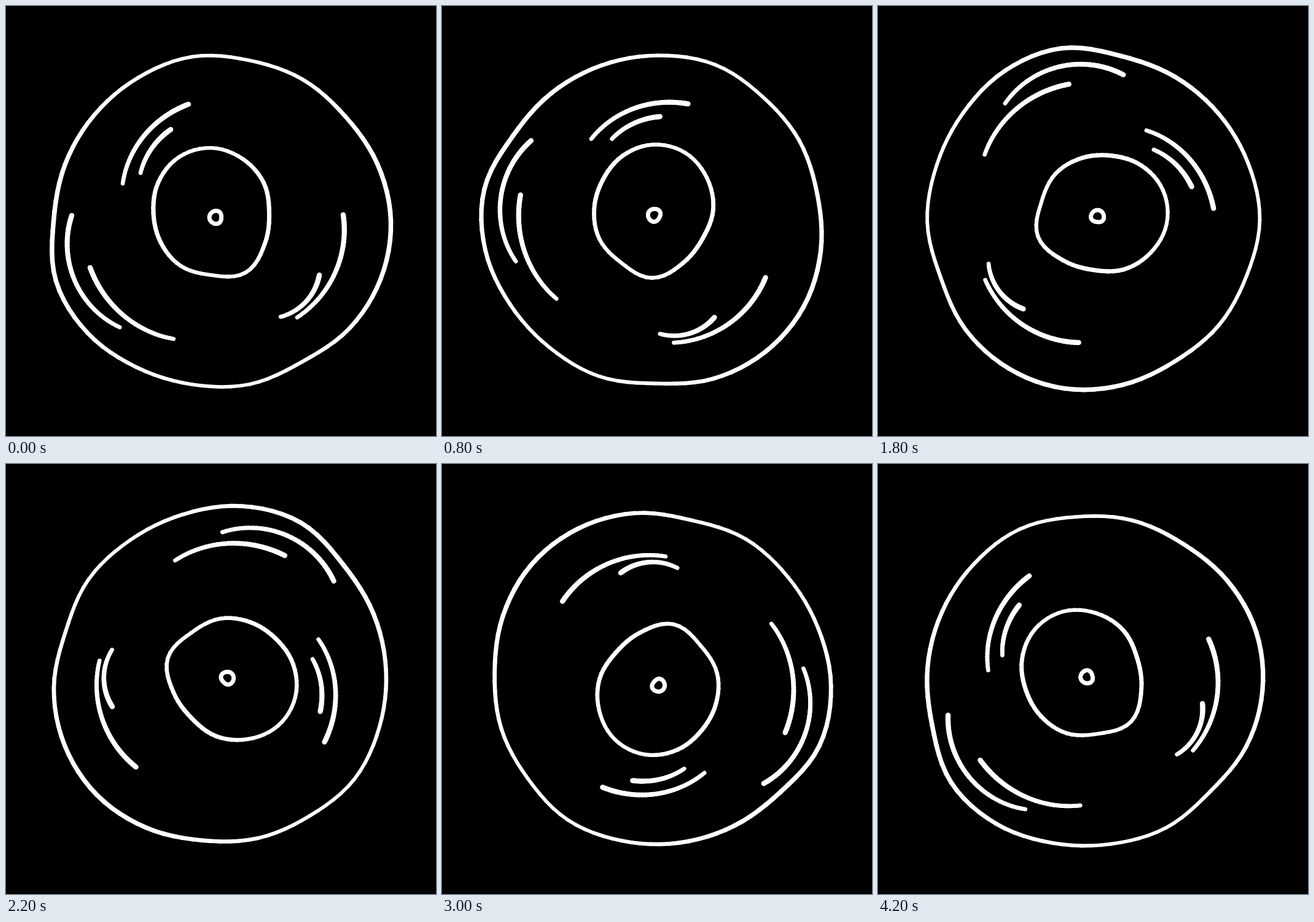
An HTML page with a canvas for the animation above (4400 ms loop, 700 by 700 pixels).

```html
<!DOCTYPE html>
<html>
<head>
<meta charset="utf-8">
<title>Spinning record</title>
<style>
  html, body { margin: 0; width: 100%; height: 100%; overflow: hidden; background: #000; }
  canvas { display: block; }
</style>
</head>
<body>
<canvas id="stage" width="700" height="700"></canvas>
<script>
const ctx = document.getElementById('stage').getContext('2d');
const SIZE = 700, MID = SIZE / 2, LOOP = 4400, STEPS = 22, TURN = 2 * Math.PI;

// Uneven rings: radii at equal angles, clockwise from the right.
const rings = [
  { x: MID, y: MID, swell: 0.9, radii: [276.5, 276.5, 272.5, 264.5, 269.8, 270.2, 275, 283.5, 285.8,
    272.5, 270, 269, 269.5, 271.5, 265.5, 266, 264.5, 271] },
  { x: 334, y: 337, swell: 0.5, radii: [94.5, 100.7, 112, 101, 99.3, 95, 94, 99.5, 105, 106, 102, 98.7] },
  { x: 341, y: 344, swell: 0, radii: [9.5, 11, 10, 10, 10, 11] }
];

// Shine marks around the middle: angles in degrees, radii at both ends, outward bulge.
const shines = [
  { from: 254.4, to: 200.9, inner: 197.3, outer: 171.2, bulge: 2.6 },
  { from: 241.2, to: 210.8, inner: 170, outer: 152.5, bulge: 2 },
  { from: 182.1, to: 133.6, inner: 243.2, outer: 239, bulge: 16 },
  { from: 160.4, to: 111.9, inner: 226.2, outer: 206.9, bulge: 4.5 },
  { from: -2.9, to: 51.7, inner: 199.2, outer: 200, bulge: 4.4 },
  { from: 28.8, to: 58.1, inner: 182.6, outer: 183.7, bulge: 7.5 }
].map(({ inner, outer, ...rest }) => ({ start: inner, end: outer, ...rest }));

const lerp = (a, b, t) => a + (b - a) * t;
const spline = (a, b, c, d, t) =>
  b + t / 2 * (c - a + t * (2 * a - 5 * b + 4 * c - d + t * (3 * (b - c) + d - a)));

// Strokes a polar curve in short pieces; pen(u) gives angle, radius and line width.
function polarStroke(x, y, pieces, pen) {
  const point = ({ angle, radius }) => [x + radius * Math.cos(angle), y + radius * Math.sin(angle)];
  for (let n = 0; n < pieces; n++) {
    const a = pen(n / pieces), b = pen((n + 1) / pieces);
    ctx.lineWidth = b.width;
    ctx.beginPath();
    ctx.moveTo(...point(a));
    ctx.lineTo(...point(b));
    ctx.stroke();
  }
}

function drawRing({ x, y, swell, radii }) {
  const count = radii.length;
  polarStroke(x, y, count * 6, u => {
    const i = Math.floor(u * count), angle = u * TURN;
    const near = [-1, 0, 1, 2].map(k => radii[(i + k + count) % count]);
    return {
      angle,
      radius: spline(...near, u * count - i),
      width: 6.6 + swell * Math.cos(2 * angle)
    };
  });
}

function drawShine({ from, to, start, end, bulge }) {
  polarStroke(MID, MID, 30, u => ({
    angle: lerp(from, to, u) * TURN / 360,
    radius: lerp(start, end, u) + 4 * u * (1 - u) * bulge,
    width: lerp(8.4, 6.6, u)
  }));
}

// Cubic Bezier easing: slow start, fastest past the middle.
const bezier = (p, q, u) => 3 * u * (1 - u) ** 2 * p + 3 * u * u * (1 - u) * q + u ** 3;

function ease(time) {
  let low = 0, high = 1;
  for (let n = 0; n < 24; n++) {
    const u = (low + high) / 2;
    if (bezier(0.45, 0.67, u) < time) low = u; else high = u;
  }
  return bezier(0.14, 0.69, low);
}

function draw(now) {
  const step = Math.floor(now % LOOP / LOOP * STEPS);
  ctx.setTransform(1, 0, 0, 1, 0, 0);
  ctx.fillStyle = '#000';
  ctx.fillRect(0, 0, SIZE, SIZE);
  ctx.translate(MID, MID);
  ctx.rotate(TURN * ease(step / STEPS));
  ctx.translate(-MID, -MID);
  ctx.strokeStyle = '#fff';
  ctx.lineCap = 'round';
  rings.forEach(drawRing);
  shines.forEach(drawShine);
}

const begin = performance.now();
function tick() {
  draw(performance.now() - begin);
  requestAnimationFrame(tick);
}
tick();
</script>
</body>
</html>
```
